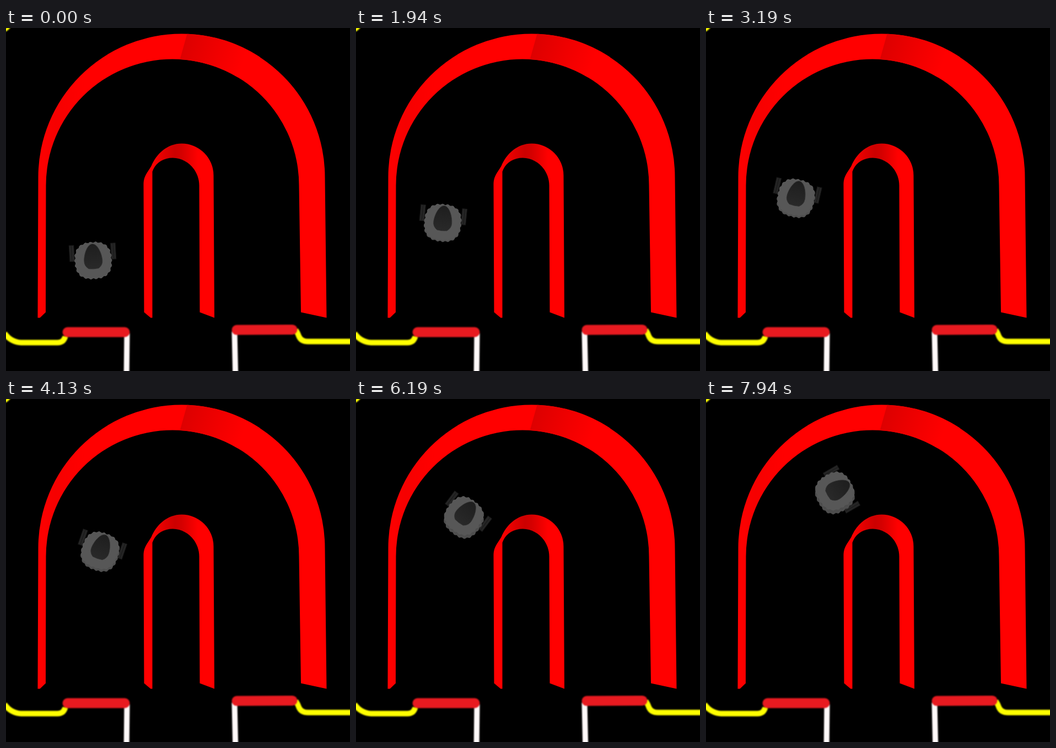
Write an HTML page that moves like this. It is 624x622 px and loops after 8000 ms.

```html
<!DOCTYPE html>
<html lang="en">
<head>
<meta charset="utf-8">
<title>Robot on a track</title>
<style>
html, body { margin: 0; width: 100%; height: 100%; overflow: hidden; background: #000; }
svg { display: block; width: 100%; height: 100%; }
</style>
</head>
<body>
<svg viewBox="0 0 624 622">
  <defs>
    <linearGradient id="outer" gradientUnits="userSpaceOnUse" x1="58" y1="0" x2="578" y2="0">
      <stop offset="0" stop-color="#f00"/>
      <stop offset=".06" stop-color="#f60000"/>
      <stop offset=".16" stop-color="#f00"/>
      <stop offset="1" stop-color="#f00"/>
    </linearGradient>
    <linearGradient id="shade" gradientUnits="userSpaceOnUse" x1="318" y1="30" x2="440" y2="72">
      <stop offset="0" stop-color="#dc0000"/>
      <stop offset=".4" stop-color="#ec0000"/>
      <stop offset=".9" stop-color="#f00"/>
    </linearGradient>
    <linearGradient id="inner" gradientUnits="userSpaceOnUse" x1="264" y1="0" x2="348" y2="0">
      <stop offset="0" stop-color="#f00"/>
      <stop offset=".3" stop-color="#de0000"/>
      <stop offset=".5" stop-color="#cc0000"/>
      <stop offset=".64" stop-color="#d40000"/>
      <stop offset="1" stop-color="#f00"/>
    </linearGradient>
    <linearGradient id="dome" x1="0" y1="0" x2="0" y2="1">
      <stop offset="0" stop-color="#1e1e1e"/>
      <stop offset="1" stop-color="#292929"/>
    </linearGradient>
    <filter id="soft" filterUnits="userSpaceOnUse" x="-20" y="-20" width="664" height="662" color-interpolation-filters="sRGB">
      <feGaussianBlur stdDeviation=".9"/>
    </filter>
    <path id="hull"/>
  </defs>
  <rect width="624" height="622"/>

  <g transform="translate(.5 .5)">
    <g fill="none" filter="url(#soft)">
      <g stroke="#ff0" stroke-width="10">
        <path d="M-4 4Q2 3 6 -4" stroke-width="5"/>
        <path d="M-3 553Q8 569 27 570H93Q104 570 107 559"/>
        <path d="M525 547Q529 553 531 559Q535 568 547 568H640"/>
      </g>
      <path d="M219 553L218 640M414 550L416 640" stroke="#fffafa" stroke-width="10"/>
      <path d="M111 551L215 551M418 547L519 546.500" stroke="#e81a20" stroke-width="18" stroke-linecap="round"/>
    </g>
    <path fill="url(#outer)" d="M57 525L58 270A260 260 0 0 1 578 270L581 525L534.500 515L531 285A229.500 229 0 0 0 72 285L71.500 515L61 525Z"/>
    <path fill="url(#shade)" d="M328 10.200A260 260 0 0 1 460 52L420 89A229.500 229 0 0 0 315 56.400Z"/>
    <path fill="url(#inner)" d="M250 515L249 283C249 268 256 262 263 250C272 228 292 209 318 209A58 58 0 0 1 376 267L377.500 525L351 515L350 285C350 258 328 235 302 235C284 235 270 245 265 260V525H262Z"/>
  </g>

  <g id="wheels" fill="#252525" stroke="#181818">
    <rect x="-42" y="-14.500" width="8.500" height="29"/>
    <rect x="33.500" y="-14.500" width="8.500" height="29"/>
    <path d="M-38 -14V14M38 -14V14"/>
  </g>
  <g id="layers" fill="#484848"></g>
  <g id="top">
    <use href="#hull" fill="#575757"/>
    <path fill="url(#dome)" stroke="#303030" stroke-width=".8" transform="translate(0 -7)"
      d="M0 -23C9 -23 16 -6 16.500 7Q17 16 9 21.500Q0 23 -9 21.500Q-17 16 -16.500 7C-16 -6 -9 -23 0 -23Z"/>
  </g>
</svg>
<script>
const LOOP = 8000, STEP = 62.5, DEG = Math.PI / 180, LAYERS = 4;
const $ = id => document.getElementById(id);

// time, axle x, axle y, heading in degrees
const PATH = [
  [0, 157, 406.7, -3.4],
  [1125, 156.8, 362, 1.5],
  [1937.5, 158.3, 338.7, 5.7],
  [3187.5, 166, 294.5, 13],
  [5062.5, 186, 233.5, 26],
  [6187.5, 204, 203.5, 36.9],
  [7937.5, 246, 163.5, 60]
];

// rounded square with a scalloped rim
function hullPath() {
  const pts = [], n = 2.6;
  for (let a = 0; a < 360; a += 3) {
    const c = Math.cos(a * DEG), s = Math.sin(a * DEG);
    const r = 32.6 / (Math.abs(c) ** n + Math.abs(s) ** n) ** (1 / n)
      + Math.sin(a * 22 * DEG + 0.6);
    pts.push((r * c).toFixed(1) + ' ' + (r * s).toFixed(1));
  }
  return 'M' + pts.join('L') + 'Z';
}

function slope(i, k) {
  const a = PATH[Math.max(i - 1, 0)], b = PATH[Math.min(i + 1, PATH.length - 1)];
  return (b[k] - a[k]) / (b[0] - a[0]);
}

// cubic Hermite interpolation of column k
function sample(t, k) {
  let i = 0;
  while (i < PATH.length - 2 && t > PATH[i + 1][0]) i++;
  const a = PATH[i], b = PATH[i + 1], h = b[0] - a[0], u = (t - a[0]) / h;
  const v = 1 - u;
  return a[k] * v * v * (1 + 2 * u) + b[k] * u * u * (3 - 2 * u)
    + h * u * v * (slope(i, k) * v - slope(i + 1, k) * u);
}

function place(el, x, y, turn) {
  el.setAttribute('transform', `translate(${x.toFixed(2)} ${y.toFixed(2)}) rotate(${turn.toFixed(2)})`);
}

$('hull').setAttribute('d', hullPath());
for (let i = 0; i < LAYERS; i++) {
  const use = document.createElementNS('http://www.w3.org/2000/svg', 'use');
  use.setAttribute('href', '#hull');
  use.setAttribute('stroke', '#575757');
  use.setAttribute('stroke-width', '.6');
  $('layers').append(use);
}

function draw(ms) {
  const t = Math.floor((ms % LOOP + 2.5) / STEP) * STEP % LOOP;
  const x = sample(t, 1), y = sample(t, 2), turn = sample(t, 3);
  place($('wheels'), x, y, turn);
  const bx = x - 14.5 * Math.sin(turn * DEG) + 0.4;
  const by = y + 14.5 * Math.cos(turn * DEG) + 0.5;
  const lean = (y - 406.7) * 0.0175; // camera parallax of the upper side
  [...$('layers').children].forEach((el, i) =>
    place(el, bx, by + lean * (-0.45 + 1.45 * i / LAYERS), turn));
  place($('top'), bx, by + lean, turn);
}

const start = performance.now();
function tick() {
  draw(performance.now() - start);
  requestAnimationFrame(tick);
}
draw(0);
requestAnimationFrame(tick);
</script>
</body>
</html>
```
